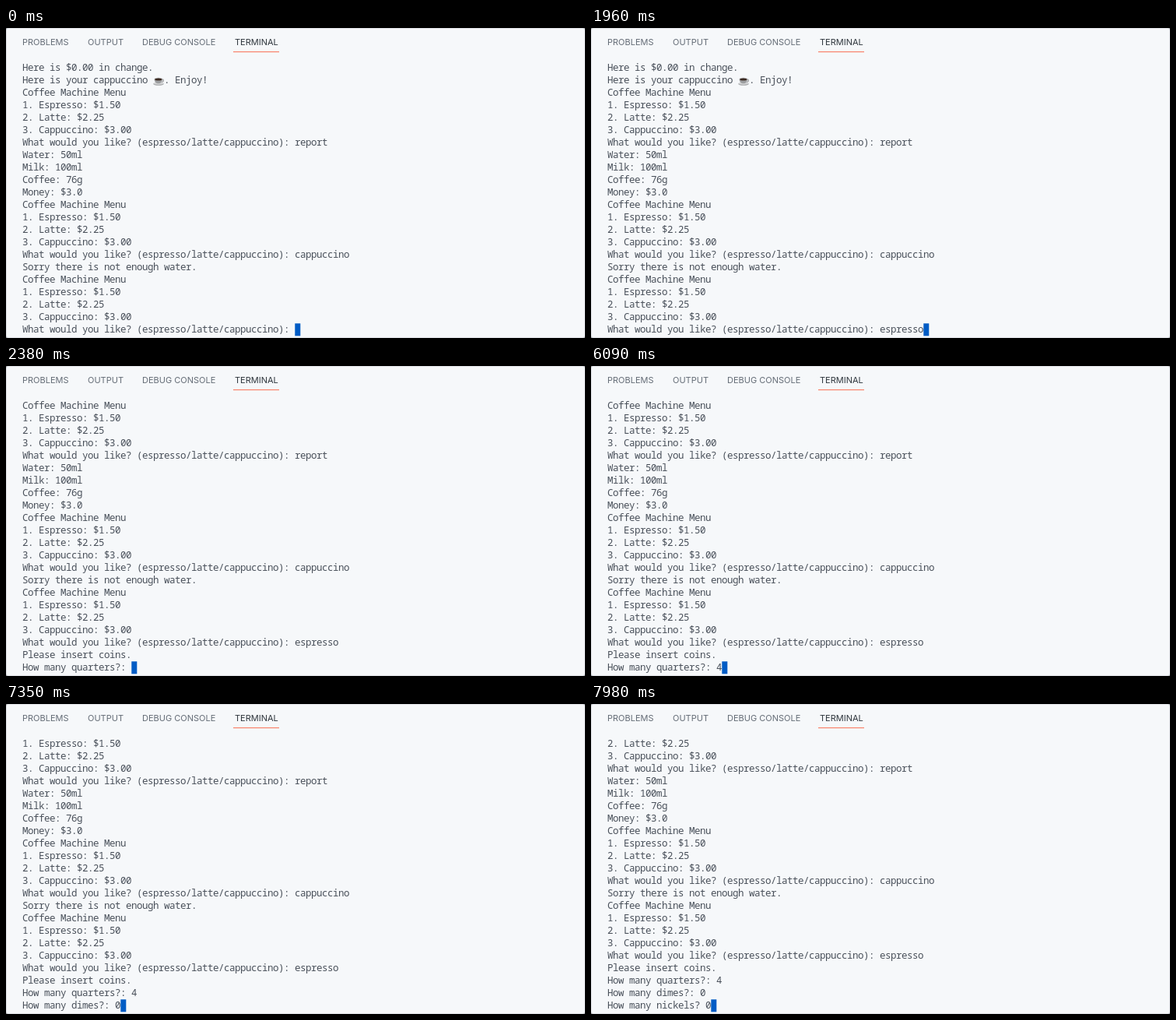
Write an HTML page with a canvas that moves like this. It is 744 px wide and 398 px high and loops after 8000 ms.

```html
<!DOCTYPE html>
<html lang="en">
<head>
<meta charset="utf-8">
<title>Coffee machine terminal</title>
<style>
html, body { margin: 0; width: 100%; height: 100%; overflow: hidden; background: #f6f8fa; }
canvas { display: block; }
</style>
</head>
<body>
<canvas id="stage" width="744" height="398"></canvas>
<script>
const ctx = document.getElementById('stage').getContext('2d');
const W = 744, H = 398, LOOP = 8000;
const LEFT = 21, TOP = 43, CELL = 7, ROW = 16, ROWS = 22;
const MONO = '12.5px "Noto Sans Mono", "DejaVu Sans Mono", monospace';
const SANS = '11px Inter, Roboto, sans-serif';

const menu = 'Coffee Machine Menu\n1. Espresso: $1.50\n2. Latte: $2.25\n3. Cappuccino: $3.00\n' +
  'What would you like? (espresso/latte/cappuccino): ';
const start = 'Here is $0.00 in change.\nHere is your cappuccino \u2615. Enjoy!\n' +
  menu + 'report\nWater: 50ml\nMilk: 100ml\nCoffee: 76g\nMoney: $3.0\n' +
  menu + 'cappuccino\nSorry there is not enough water.\n' + menu;

// [time in ms, text appended to the terminal]
const events = [
  [1120, 'e'], [1190, 's'], [1330, 'p'], [1470, 'r'],
  [1540, 'e'], [1610, 's'], [1820, 's'], [1960, 'o'],
  [2310, '\n'], [2380, 'Please insert coins.\nHow many quarters?: '],
  [6090, '4'], [6370, '\nHow many dimes?: '],
  [7350, '0'], [7700, '\nHow many nickels? '], [7980, '0']
];

const tabs = [['PROBLEMS', 21], ['OUTPUT', 105], ['DEBUG CONSOLE', 175], ['TERMINAL', 294]];

function ellipse(x, y, rx, ry, color) {
  ctx.fillStyle = color;
  ctx.beginPath();
  ctx.ellipse(x, y, rx, ry, 0, 0, Math.PI * 2);
  ctx.fill();
}

function drawCup(x, y) {
  ctx.save();
  ctx.translate(x, y);
  ellipse(7, 11.8, 6.8, 1.9, '#a3a5a7');
  ellipse(7, 11.3, 6.2, 1.4, '#d5d6d7');
  ctx.strokeStyle = '#8f9193';
  ctx.lineWidth = 1.1;
  ctx.beginPath();
  ctx.arc(11.6, 7.6, 1.7, -1.6, 1.8);
  ctx.stroke();
  ctx.fillStyle = '#9c9ea0';
  ctx.beginPath();
  ctx.moveTo(1.6, 5.8);
  ctx.bezierCurveTo(1.8, 13.2, 11.8, 13.2, 12, 5.8);
  ctx.fill();
  ellipse(6.8, 5.8, 5.2, 2, '#b9babb');
  ellipse(6.8, 6, 4.5, 1.5, '#3b2a22');
  ctx.restore();
}

function drawPanel() {
  ctx.fillStyle = '#8b8d90';
  ctx.fillRect(0, 0, W, H);
  ctx.fillStyle = '#f6f8fa';
  ctx.strokeStyle = '#dcdfe3';
  ctx.lineWidth = 1;
  ctx.beginPath();
  ctx.roundRect(0.5, 0.5, W - 1, H - 1, 2);
  ctx.fill();
  ctx.stroke();

  ctx.font = SANS;
  ctx.letterSpacing = '0px';
  for (const [name, x] of tabs) {
    ctx.fillStyle = name === 'TERMINAL' ? '#2f363d' : '#656d77';
    ctx.fillText(name, x, 22);
  }
  ctx.fillStyle = '#f9826c';
  ctx.fillRect(292, 30, 59, 1.2);
}

function drawTerminal(t) {
  const text = start + events.filter(e => e[0] <= t).map(e => e[1]).join('');
  const lines = text.split('\n').slice(-ROWS);
  ctx.font = MONO;
  ctx.letterSpacing = '-0.5px';
  lines.forEach((line, i) => {
    const y = TOP + i * ROW, cup = line.indexOf('\u2615');
    ctx.fillStyle = '#49505a';
    ctx.fillText(line.replace('\u2615', '  '), LEFT, y + 12);
    if (cup >= 0) drawCup(LEFT + cup * CELL, y + 1);
  });
  ctx.fillStyle = '#005cc5';
  const x = LEFT + lines[ROWS - 1].length * CELL;
  ctx.fillRect(x + 0.3, TOP + (ROWS - 1) * ROW + 0.3, CELL, ROW);
}

let origin = null;
function frame(now) {
  if (origin === null) origin = now;
  drawPanel();
  drawTerminal((now - origin) % LOOP);
  requestAnimationFrame(frame);
}
requestAnimationFrame(frame);
</script>
</body>
</html>
```
